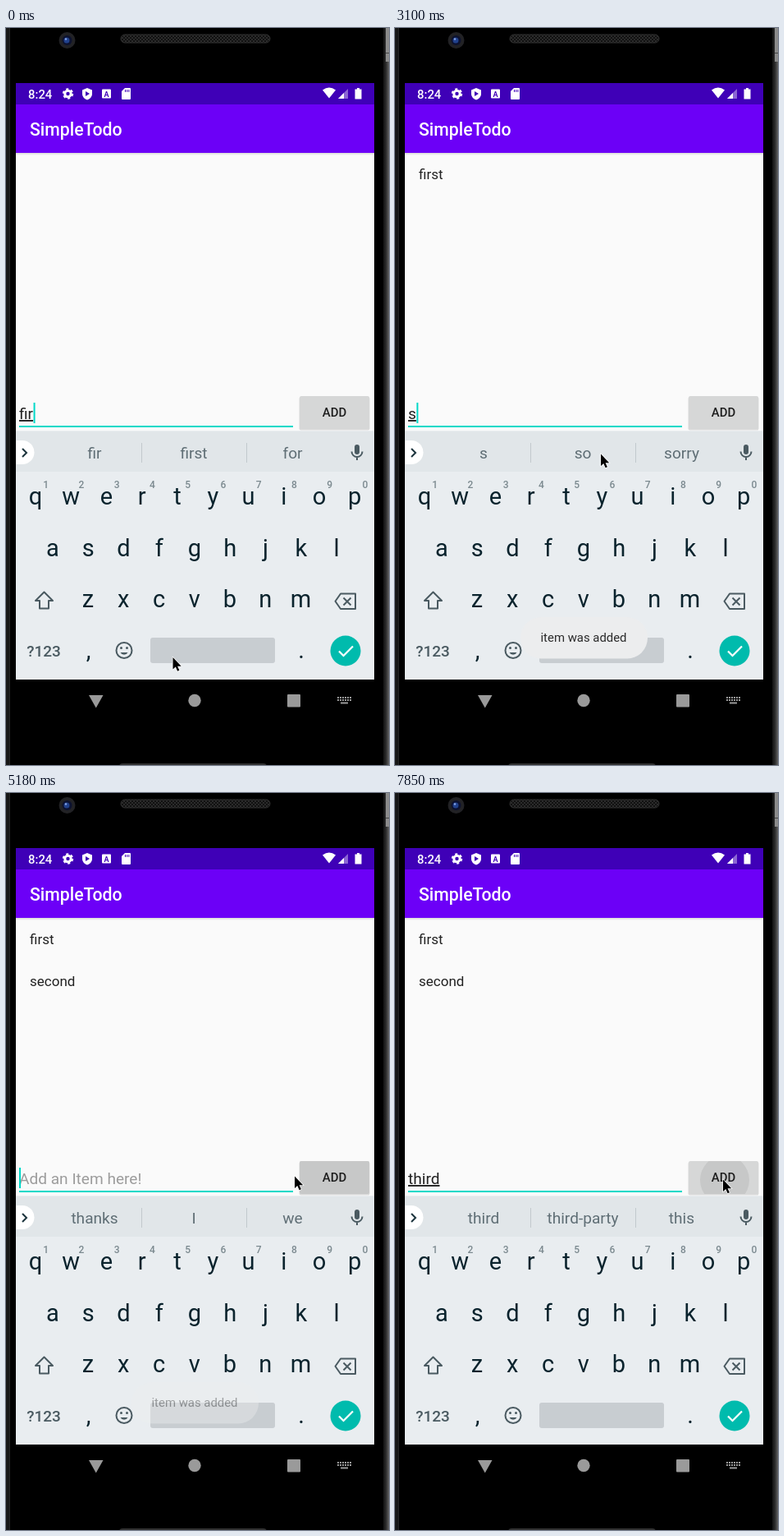
An HTML page for the animation above (8 s loop, 467 px wide and 897 px high).

```html
<!DOCTYPE html>
<html lang="en">
<head>
<meta charset="utf-8">
<title>Todo app</title>
<style>
  html, body { margin: 0; height: 100%; overflow: hidden; background: #000; }
  svg { display: block; width: 467px; height: 897px; font-family: Roboto, sans-serif; }
  .mid { text-anchor: middle; }
  .key { font-size: 29px; fill: #0a232d; }
  .digit { font-size: 12px; font-weight: 500; fill: #7b898f; }
  .word { font-size: 19.1px; fill: #5f6e75; }
  .line { fill: none; stroke: #4a5a61; stroke-width: 2; }
  .item { font-size: 17px; fill: #212121; }
  #typed { font-size: 19.1px; text-decoration: underline 1px; fill: #212121; }
</style>
</head>
<body>
<svg viewBox="0 0 467 897">
  <defs>
    <linearGradient id="edge"><stop stop-color="#111"/><stop offset=".45" stop-color="#292929"/><stop offset="1" stop-color="#626262"/></linearGradient>
    <linearGradient id="shade" x2="0" y2="1"><stop stop-opacity=".14"/><stop offset="1" stop-opacity="0"/></linearGradient>
    <pattern id="mesh" width="4" height="4" patternUnits="userSpaceOnUse">
      <rect width="4" height="4" fill="#2b2b2b"/><path d="M0 0l4 4M4 0L0 4" stroke="#111"/>
    </pattern>
    <clipPath id="button"><rect x="358" y="448" width="85" height="40" rx="2"/></clipPath>
  </defs>

  <!-- phone body -->
  <rect width="467" height="897"/>
  <rect width="4" height="897" fill="#171717"/>
  <path d="M4.5 0V897" stroke="#242424"/>
  <rect x="460" width="7" height="897" fill="url(#edge)"/>
  <path d="M463 0h4v41h-4z" fill="#8b8b8b"/>
  <path d="M463 30.5h4" stroke="#444"/>
  <rect x="140" y="8" width="182" height="10" rx="5" fill="url(#mesh)" stroke="#303030"/>
  <rect x="138" y="895" width="180" height="8" rx="4" fill="#303030"/>
  <circle cx="74.500" cy="15" r="10" fill="#222225"/>
  <circle cx="74.500" cy="15" r="6" fill="#0c1230"/>
  <circle cx="74" cy="15" r="3.500" fill="#21418c"/>
  <circle cx="73" cy="13.500" r="1.200" fill="#86a6e8"/>

  <!-- status and title bars -->
  <rect x="12" y="67" width="437" height="424" fill="#fafafa"/>
  <rect x="12" y="67" width="437" height="26" fill="#3f00b7"/>
  <rect x="12" y="93" width="437" height="59" fill="#6c00f7"/>
  <rect x="12" y="152" width="437" height="3" fill="url(#shade)"/>
  <g fill="#fff">
    <text x="27" y="85.500" font-size="14.900" font-weight="500">8:24</text>
    <text x="29" y="131" font-size="21.270" font-weight="500">SimpleTodo</text>
    <circle cx="75.500" cy="80" r="3.700" fill="none" stroke="#fff" stroke-width="3"/>
    <circle cx="75.500" cy="80" r="5.700" fill="none" stroke="#fff" stroke-width="2" stroke-dasharray="3 2.970"/>
    <path d="M99 73l6 2.500v4.500c0 4-3 6.500-6 7.500-3-1-6-3.500-6-7.500v-4.500z"/>
    <path d="M97 77l5 3-5 3z" fill="#3f00b7"/>
    <rect x="117" y="74.500" width="11" height="11" rx="1"/>
    <text class="mid" x="122.500" y="83.500" font-size="9" font-weight="700" fill="#3f00b7">A</text>
    <path d="M145 73h6q1 0 1 1v12q0 1-1 1h-9q-1 0-1-1v-9z"/>
    <path d="M145.500 75v3M147.700 75v3M149.900 75v3" stroke="#3f00b7"/>
    <path d="M386 75.500q8-6 16 0l-8 10z"/>
    <path d="M417 74v12h-12z" opacity=".4"/><path d="M412 79v7h-7z"/>
    <path d="M428 73h3v1.500h2.500v12h-8v-12h2.500z"/>
  </g>

  <!-- list and entry field -->
  <text class="item" id="item1" x="29" y="184">first</text>
  <text class="item" id="item2" x="29" y="235">second</text>
  <text id="hint" x="16" y="476" font-size="19.100" fill="#9c9c9c">Add an Item here!</text>
  <text id="typed" x="16" y="476"></text>
  <path d="M16 485h334" stroke="#00d9c8" stroke-width="2"/>
  <rect id="caret" y="456" width="2" height="25" fill="#00d9c8"/>
  <rect x="357.500" y="449" width="86" height="40.500" rx="2" opacity=".13"/>
  <g clip-path="url(#button)">
    <rect x="358" y="448" width="85" height="40" fill="#d6d7d7"/>
    <circle id="ripple" cx="402" cy="471" fill="#c7c8c8"/>
  </g>
  <text class="mid" x="400.500" y="473" font-size="14.900" font-weight="500" fill="#1d1d1d">ADD</text>

  <!-- keyboard -->
  <rect x="12" y="490" width="437" height="303" fill="#e9edf0"/>
  <rect x="12" y="491" width="437" height="49" fill="#e1e6e9"/>
  <path d="M12 502h8a14.500 14.500 0 0 1 0 29h-8z" fill="#fff"/>
  <path d="M20 512l5 5-5 5" class="line" style="stroke:#1b333c"/>
  <path d="M165.500 505v24M293.500 505v24" stroke="#c2c9cd"/>
  <g id="words"></g>
  <rect x="425" y="507" width="6" height="12" rx="3" fill="#4a5a61"/>
  <path d="M421.500 515.500a6.500 6.500 0 0 0 13 0M428 522v4" class="line"/>
  <g id="keys"></g>
  <path d="M46.500 686.500l10.500 10.500h-5v9.500h-11v-9.500h-5z" class="line" stroke-linejoin="round"/>
  <path d="M408 688.500h18v18.500h-18l-6.500-9.250zM411.500 693.500l9 9M420.500 693.500l-9 9" class="line" stroke-linejoin="round"/>
  <text class="mid" x="46" y="764.500" font-size="19" font-weight="500" fill="#4a5a61">?123</text>
  <circle cx="144" cy="757.500" r="9.500" class="line"/>
  <path d="M139.500 760a5 5 0 0 0 9 0z" fill="#4a5a61"/>
  <circle cx="140.500" cy="754.500" r="1.500" fill="#4a5a61"/><circle cx="147.500" cy="754.500" r="1.500" fill="#4a5a61"/>
  <rect x="176" y="742" width="152" height="31" rx="3" fill="#c8cdd1"/>
  <circle cx="414" cy="758" r="18.500" fill="#00bbad"/>
  <path d="M406 758.500l5.500 5.500 11.500-11.500" fill="none" stroke="#fff" stroke-width="2.200"/>

  <!-- navigation bar -->
  <g fill="#9a9a9a">
    <path d="M101 812h17.500l-8.750 15.500z"/>
    <circle cx="230" cy="818.500" r="7.700"/>
    <rect x="343" y="811" width="16" height="15.500" rx="1"/>
    <path d="M404 815h17M404 818h17" stroke="#9a9a9a" stroke-width="2" stroke-dasharray="2 1"/>
    <path d="M408 821.500h9" stroke="#9a9a9a" stroke-width="2"/>
  </g>

  <g id="toast">
    <rect x="153" y="717" width="155" height="50.500" rx="25" fill="#ecedee"/>
    <text x="177.500" y="747" font-size="14.900" fill="#2b2b2b">item was added</text>
  </g>
  <path id="pointer" d="M0 0v14.500l3.300-3 2.300 5.300 2.300-1-2.300-5.100h4.600z" stroke="#fff" stroke-width="1.300" paint-order="stroke"/>
</svg>
<script>
const $ = id => document.getElementById(id);
const TICK = 148, LOOP = 8000;

// [tick, typed text, suggestions]
const edits = [
  [0, 'fir', 'fir first for'],
  [2, 'firs', 'firs first forst'],
  [3, 'first', 'first firstly first-hand'],
  [15, '', 'thanks I we'],
  [21, 's', 's so sorry'],
  [22, 'se', 'se see send'],
  [24, 'sec', 'sec second secret'],
  [25, 'seco', 'seco second seconds'],
  [26, 'secon', 'secon second seconds'],
  [27, 'second', 'second seconds secondary'],
  [34, '', 'thanks I we'],
  [40, 't', 't to the'],
  [41, 'th', 'th thanks thank'],
  [44, 'thi', 'thi this think'],
  [45, 'thir', 'thir third thirty'],
  [48, 'third', 'third third-party this']
];
// [tick, x, y] of the pointer tip
const moves = [
  [0, 203.5, 766], [6, 262, 783], [7, 368, 764], [8, 436, 712], [9, 462.5, 658],
  [10, 456, 592], [11, 438, 530], [12, 414, 488], [13, 400, 470.5],
  [16, 372, 480], [17, 306, 505], [18, 251, 518.5],
  [29, 297, 462.5], [30, 344, 466], [31, 384, 469], [32, 400, 470.5],
  [35, 352, 466.5], [36, 264, 476], [50, 292, 474], [51, 342, 472], [52, 384, 471], [53, 400, 470.5]
];
const presses = [14, 33, 53];

const latest = (track, tick) => track.findLast(entry => entry[0] <= tick);
const clamp = v => Math.max(0, Math.min(1, v));
const show = (id, on) => $(id).setAttribute('visibility', on ? 'visible' : 'hidden');
const label = (cls, x, y, text) => `<text class="mid ${cls}" x="${x}" y="${y}">${text}</text>`;

const row = (letters, x, y) => [...letters].map((c, i) => label('key', x + 43.25 * i, y, c)).join('');
$('keys').innerHTML = row('qwertyuiop', 36, 580) + row('asdfghjkl', 57, 642.5) +
  row('zxcvbnm', 100, 705) + label('key', 100.5, 767, ',') + label('key', 360, 767, '.') +
  [...'1234567890'].map((c, i) => label('digit', 48.7 + 43.25 * i, 559.5, c)).join('');
$('words').innerHTML = [108, 229, 349.5].map(x => label('word', x, 524, '')).join('');

// Toast opacity, measured in ticks since the item was added
const toastAlpha = age => age < 0 ? 0 : Math.min(clamp(age * 0.4), clamp((18 - age) / 3));

function draw(tick) {
  const [editTick, text, suggestions] = latest(edits, tick);
  $('typed').textContent = text;
  show('hint', !text);
  show('caret', (tick - editTick) % 7 < 3);
  $('caret').setAttribute('x', text ? 16.5 + $('typed').getComputedTextLength() : 16);
  suggestions.split(' ').forEach((word, i) => $('words').children[i].textContent = word);

  show('item1', tick >= 15);
  show('item2', tick >= 34);
  $('toast').setAttribute('opacity', Math.max(toastAlpha(tick - 15), toastAlpha(tick - 34)));

  const age = tick - (presses.findLast(p => p <= tick) ?? -9);
  $('ripple').setAttribute('r', age > 2 ? 0 : age ? 60 : 30);

  const [, x, y] = latest(moves, tick);
  $('pointer').setAttribute('transform', `translate(${x} ${y})`);
}

const start = performance.now();
function frame() {
  const time = (performance.now() - start) % LOOP;
  draw(Math.min(53, Math.floor((time + 9) / TICK)));
  requestAnimationFrame(frame);
}
frame();
</script>
</body>
</html>
```
